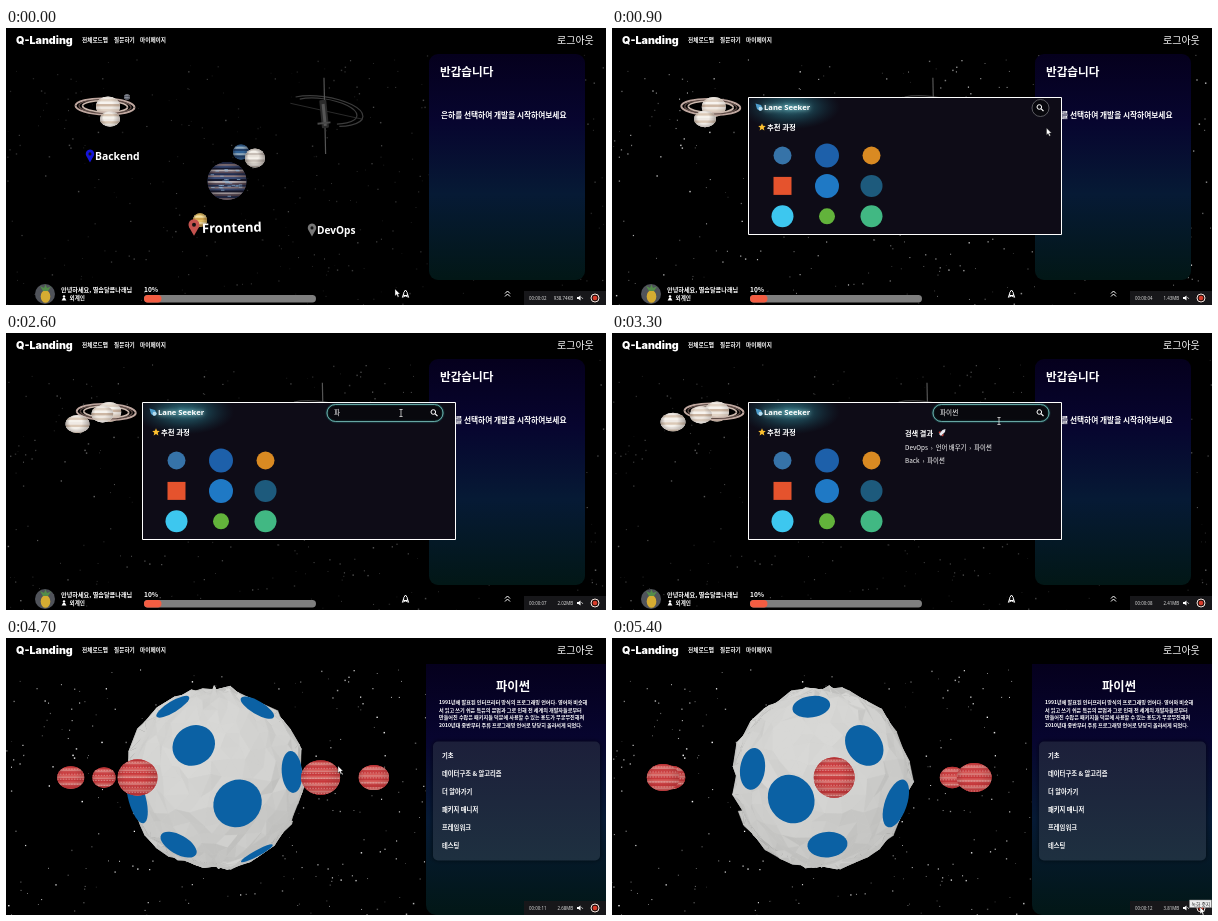
These frames come from a looping animation (600 by 277 pixels, 5500 ms). An HTML page with a canvas:

```html
<!DOCTYPE html>
<html lang="ko">
<head>
<meta charset="utf-8">
<style>
html, body { margin: 0; width: 100%; height: 100%; overflow: hidden; background: #000; }
canvas { display: block; width: 600px; height: 277px; }
</style>
</head>
<body>
<canvas id="stage"></canvas>
<script>
const canvas = document.getElementById('stage');
const ctx = canvas.getContext('2d');
const dpr = window.devicePixelRatio || 1;
canvas.width = 600 * dpr;
canvas.height = 277 * dpr;

const LOOP = 5500, MODAL = 450, LEAVE = 3700, READY = 4300;
const KO = '"Noto Sans CJK KR", "Noto Sans CJK JP", "Noto Sans CJK", sans-serif';
const LATIN = '"Noto Sans", "Open Sans", sans-serif';
const TAU = Math.PI * 2, RAD = Math.PI / 180;

const clamp = v => Math.max(0, Math.min(1, v));
const ease = v => v * v * (3 - 2 * v);

function random(seed) {
  return () => {
    seed = (seed * 1664525 + 1013904223) >>> 0;
    return seed / 4294967296;
  };
}

// Keys are [time, ...values]; values between keys are interpolated.
function track(keys, t, curve = v => v) {
  let i = 0;
  while (i < keys.length - 2 && t >= keys[i + 1][0]) i++;
  const a = keys[i], b = keys[i + 1];
  const k = curve(clamp((t - a[0]) / (b[0] - a[0])));
  return a.slice(1).map((v, j) => v + (b[j + 1] - v) * k);
}

function text(str, x, y, size, weight = 700, color = '#fff', font = KO, align = 'left') {
  ctx.font = `${weight} ${size}px ${font}`;
  ctx.fillStyle = color;
  ctx.textAlign = align;
  ctx.textBaseline = 'alphabetic';
  ctx.fillText(str, x, y);
}

function ellipse(x, y, rx, ry, fill, tilt = 0) {
  ctx.beginPath();
  ctx.ellipse(x, y, rx, ry, tilt, 0, TAU);
  if (fill) { ctx.fillStyle = fill; ctx.fill(); }
}

function box(x, y, w, h, r, fill, stroke, width = 1) {
  ctx.beginPath();
  ctx.roundRect(x, y, w, h, r);
  if (fill) { ctx.fillStyle = fill; ctx.fill(); }
  if (stroke) { ctx.strokeStyle = stroke; ctx.lineWidth = width; ctx.stroke(); }
}

function poly(points, fill, stroke, width = 1, close = true) {
  ctx.beginPath();
  points.forEach(([x, y], i) => i ? ctx.lineTo(x, y) : ctx.moveTo(x, y));
  if (close) ctx.closePath();
  if (fill) { ctx.fillStyle = fill; ctx.fill(); }
  if (stroke) { ctx.strokeStyle = stroke; ctx.lineWidth = width; ctx.stroke(); }
}

// Horizontally banded ball lit from the upper left.
function ball(x, y, rx, ry, colors, step = 2, shadow = .35) {
  ctx.save();
  ellipse(x, y, rx, ry, colors[0]);
  ctx.clip();
  let i = 0;
  for (let band = y - ry; band < y + ry; band += step) {
    ctx.fillStyle = colors[i++ % colors.length];
    ctx.fillRect(x - rx, band, rx * 2, step + .3);
  }
  const shade = ctx.createRadialGradient(x - rx * .3, y - ry * .4, 0, x, y, rx);
  shade.addColorStop(.5, 'rgba(20,8,8,0)');
  shade.addColorStop(1, `rgba(20,8,8,${shadow})`);
  ctx.fillStyle = shade;
  ctx.fillRect(x - rx, y - ry, rx * 2, ry * 2);
  ctx.restore();
}

// --- backdrop and page chrome

const starRandom = random(77);
const stars = Array.from({ length: 420 }, () => ({
  x: starRandom() * 620, y: 26 + starRandom() * 251,
  size: .6 + starRandom() * .9, light: .25 + starRandom() * .75
}));

function drawStars(t, strength, limit) {
  ctx.save();
  ctx.beginPath();
  ctx.rect(0, 26, limit, 251);
  ctx.clip();
  ctx.fillStyle = '#fff';
  for (const s of stars) {
    ctx.globalAlpha = s.light * strength;
    ctx.fillRect((s.x + t * .006) % 620, s.y, s.size, s.size);
  }
  ctx.restore();
}

function drawHeader() {
  text('Q-Landing', 10, 16.3, 10.7, 900, '#fff', 'Inter, Roboto, sans-serif');
  text('전체로드맵', 76, 14, 5.65, 900);
  text('질문하기', 108, 14, 5.65, 900);
  text('마이페이지', 134, 14, 5.65, 900);
  text('로그아웃', 551, 16, 10, 400);
}

function panel(x, w, h, radii) {
  const g = ctx.createLinearGradient(0, 26, 0, 26 + h);
  g.addColorStop(0, '#05001d');
  g.addColorStop(.3, '#07052f');
  g.addColorStop(.62, '#061a35');
  g.addColorStop(1, '#021716');
  box(x, 26, w, h, radii, g);
}

function drawRecorder(t) {
  box(518, 263, 82, 14, 0, '#17171a');
  const second = Math.floor(2.4 + t * .00195);
  const size = track([[0, 938.74 / 1024], [900, 1.43], [1900, 1.62], [3300, 2.41],
    [3900, 2.6], [4700, 2.68], [5400, 3.81]], t)[0];
  text('00:00:' + String(second).padStart(2, '0'), 523, 271.5, 4.4, 400, '#ddd', LATIN);
  const label = size < 1 ? (size * 1024).toFixed(2) + 'KB' : size.toFixed(2) + 'MB';
  text(label, 567, 271.5, 4.4, 400, '#ddd', LATIN, 'right');
  poly([[571, 269], [572.5, 269], [574.5, 267.5], [574.5, 272.5], [572.5, 271], [571, 271]], '#fff');
  poly([[575.3, 269], [577, 271]], null, '#fff', .6, false);
  ellipse(589, 270, 4, 4, '#26100d');
  ctx.strokeStyle = '#f2e5e0';
  ctx.lineWidth = 1;
  ctx.stroke();
  ellipse(589, 270, 2.3, 2.3, '#d63b2a');
}

function drawFooter() {
  ellipse(39, 266, 10, 10, '#50535a');
  ellipse(39.5, 268.5, 4.8, 6.3, '#d6ac32');
  poly([[37, 263], [34, 258], [38, 260], [39.5, 256.5], [41, 260], [45, 258.5], [42, 263]], '#538c4a');
  text('안녕하세요, 별솜달콤나래님', 55, 264.3, 6.15);
  ellipse(58, 268.5, 1.2, 1.2, '#fff');
  poly([[55.6, 272.4], [57, 270], [59, 270], [60.4, 272.4]], '#fff');
  text('외계인', 63.5, 272.3, 5.6);
  text('10%', 138, 264, 6.6);
  box(138, 267, 172, 7.5, 3.7, '#7f7f7f');
  box(138, 267, 17.5, 7.5, 3.7, '#f45d42');
  poly([[397.5, 267.5], [397.8, 264.5], [399.5, 262], [401.2, 264.5], [401.5, 267.5]], null, '#fff', 1);
  poly([[397.5, 266], [396.3, 269.3], [399.5, 268], [402.7, 269.3], [401.5, 266]], null, '#fff', .9, false);
  for (const y of [265.5, 268.5]) poly([[499, y], [501.5, y - 2.5], [504, y]], null, '#fff', 1, false);
}

// --- galaxy page

function pin(x, y, s, color) {
  ctx.beginPath();
  ctx.arc(x, y - s * .25, s * .5, Math.PI * .85, Math.PI * .15);
  ctx.lineTo(x, y + s * .75);
  ctx.fillStyle = color;
  ctx.fill();
  ellipse(x, y - s * .25, s * .18, s * .18, '#111');
}

function drawRinged(t) {
  const [x, y] = track([[0, 99, 78.5], [1900, 98.5, 79.5], [3300, 102, 78.5]], t);
  const [mx, my, mr] = track([[0, 104, 91, 10], [900, 93, 91, 11], [1900, 82, 93, 11.5], [3300, 61, 89, 12.5]], t);
  const [nx, ny] = track([[0, 121, 69], [600, 114, 72], [1900, 104, 80], [3300, 89, 82]], t);
  const pale = ['#f0e9e2', '#e2d4c6', '#f7f3ee', '#cdb7a4'];
  const ring = (from, to) => {
    [[29.5, 8, '#c0a8a0', 2], [26, 6.8, '#5d4a45', 1.5], [22.5, 5.7, '#cdb9ae', 1.7]].forEach(([rx, ry, color, w]) => {
      ctx.beginPath();
      ctx.ellipse(x, y, rx, ry, .03, from, to);
      ctx.strokeStyle = color;
      ctx.lineWidth = w;
      ctx.stroke();
    });
  };
  if (t < 600) ball(nx, ny, 3, 2.7, ['#8a8f99', '#565b66'], 1.4);
  ring(Math.PI, TAU);
  ball(x + 3, y, 12, 10, pale, 2.5, .15);
  ring(0, Math.PI);
  if (t > 1900) ball(nx, ny, 11, 8.5, pale, 2.5, .2);
  ball(mx, my, mr, mr * .74, ['#efe9e3', '#dbc9b7', '#f6f2ec'], 2.4, .3);
}

function drawStriped(t) {
  const a = t * -.0002;
  const around = (dx, dy) => [221 + dx * Math.cos(a) - dy * Math.sin(a), 153 + dx * Math.sin(a) + dy * Math.cos(a)];
  const small = (p, r, colors) => ball(p[0], p[1], r, r * .95, colors, 2.2);
  small(around(14, -29), 8, ['#326396', '#8fa9bc', '#213f68']);
  ball(221, 153, 19.5, 19, ['#202f54', '#8d7b80', '#384b77', '#161a31', '#b6adb0', '#5c4c58'], 1.9);
  const r = random(9);
  ctx.fillStyle = '#8bb0d3';
  for (let i = 0; i < 28; i++) {
    const q = r() * TAU, d = r() * 17;
    ctx.fillRect(219 + Math.cos(q) * d, 153 + Math.sin(q) * d, 3.5, .7);
  }
  small(around(28, -23), 10, ['#e8e2da', '#f5f1eb', '#c8bfb7']);
  small(around(-27, 39), 7, ['#e3bf65', '#f4dfa0', '#d0a34e']);
}

function drawStation(t) {
  ctx.save();
  ctx.translate(318 + 3 * Math.sin(t / 700), 90);
  ctx.rotate(-.1);
  ctx.strokeStyle = '#3c3c3c';
  ctx.lineWidth = 1.2;
  for (const rx of [40, 34]) {
    ctx.beginPath();
    ctx.ellipse(0, -7, rx, rx * .36, .25, -2.4, 1.1);
    ctx.stroke();
  }
  poly([[-32, -18], [38, 5]], null, '#333', .8, false);
  poly([[4, -40], [-2, 36]], null, '#555', 1.2, false);
  box(-3, -18, 7, 28, 1, '#2b2b2b');
  box(-1, -14, 3, 22, 0, '#555');
  box(-7, 4, 13, 2, 0, '#4a4a4a');
  ctx.restore();
}

function drawLabels() {
  pin(84, 128, 8.5, '#1515d8');
  text('Backend', 89, 132.2, 10.4, 600, '#fff', LATIN);
  pin(188, 199.5, 11, '#c5534f');
  ctx.save();
  ctx.translate(196, 205);
  ctx.rotate(-.025);
  text('Frontend', 0, 0, 13.1, 600, '#fff', LATIN);
  ctx.restore();
  pin(306, 202, 8.5, '#777');
  text('DevOps', 311, 206, 10.1, 600, '#fff', LATIN);
}

function drawGalaxy(t) {
  const strength = track([[0, .3], [900, .8], [1900, .45], [3300, .35]], t)[0];
  drawStars(t, strength, 600);
  drawRinged(t);
  drawStation(t);
  if (t < MODAL) {
    drawStriped(t);
    drawLabels();
  }
  panel(423, 156, 226, 9);
  text('반갑습니다', 434, 48, 11.6);
  text('은하를 선택하여 개발을 시작하여보세요', 435, 89.8, 7.7);
  drawFooter();
  if (t >= MODAL) drawModal(t);
}

// --- course search dialog

const courses = [
  ['#3673a8', 9], ['#1d60aa', 12], ['#d98a22', 9],
  ['#e5532d', 9, true], ['#1f79c5', 12], ['#1d5a7c', 11],
  ['#3dc7ef', 11], ['#62b33b', 8], ['#41b883', 11]
];

function drawSearch(t) {
  const open = ease(clamp((t - 1150) / 250));
  const left = 420 - 99 * open;
  ctx.save();
  if (open > 0) { ctx.shadowColor = '#2f9c96'; ctx.shadowBlur = 1.5 * dpr; }
  box(left, 71.5, 437 - left, 17, 8.5, '#08080d', open ? '#79b8b4' : '#6d6d72', .8);
  ctx.restore();
  ellipse(427.3, 79, 2.3, 2.3);
  ctx.strokeStyle = '#fff';
  ctx.lineWidth = 1;
  ctx.stroke();
  poly([[429, 80.7], [431.5, 83.2]], null, '#fff', 1.2, false);
  if (open < 1) return;
  const typed = '파이썬'.slice(0, clamp((t - 2100) / 800) * 3);
  if (typed) text(typed, 328, 82, 6.6, 400);
  else text('search', 328, 82, 6.4, 400, '#8c8c90', LATIN);
}

function drawResults() {
  text('검색 결과', 293, 102.6, 7.2);
  poly([[333.5, 96], [333, 99], [329, 103], [327, 101], [330.5, 97]], '#e8e8ef');
  poly([[329, 98], [326.5, 99], [327.5, 100.5]], '#d3483c');
  poly([[332, 100.5], [331, 103.5], [329.5, 102.5]], '#d3483c');
  text('DevOps  ›  언어 배우기  ›  파이썬', 293, 117, 6.4, 500);
  text('Back  ›  파이썬', 293, 130, 6.4, 500);
}

function drawTitleGlow() {
  ctx.save();
  ctx.beginPath();
  ctx.rect(137, 70, 312, 136);
  ctx.clip();
  ctx.translate(178, 79);
  ctx.scale(1, .45);
  const glow = ctx.createRadialGradient(0, 0, 0, 0, 0, 50);
  glow.addColorStop(0, 'rgba(60,150,165,.75)');
  glow.addColorStop(.5, 'rgba(35,105,120,.45)');
  glow.addColorStop(1, 'rgba(20,70,85,0)');
  ctx.fillStyle = glow;
  ctx.fillRect(-50, -50, 100, 100);
  ctx.restore();
}

function drawModal(t) {
  box(136.5, 69.5, 313, 137, 0, '#0e0c17', '#fff', 1);
  drawTitleGlow();
  poly([[143.5, 75.5], [149, 77], [151, 81], [148, 83], [145, 81]], '#4d9dcc');
  ellipse(148.5, 80.7, 2, 2, '#b9dced');
  ctx.save();
  ctx.shadowColor = '#bff';
  ctx.shadowBlur = 4 * dpr;
  text('Lane Seeker', 152, 82, 7.6, 700, '#fff', LATIN);
  ctx.restore();
  const points = Array.from({ length: 10 }, (_, i) => {
    const a = i * Math.PI / 5 - Math.PI / 2, r = i % 2 ? 1.8 : 4;
    return [150 + Math.cos(a) * r, 99.3 + Math.sin(a) * r];
  });
  poly(points, '#fdc02f');
  text('추천 과정', 155, 102, 7.4);
  courses.forEach(([color, r, square], i) => {
    const x = 170.5 + i % 3 * 44.5, y = 127.5 + Math.floor(i / 3) * 30.4;
    if (square) box(x - r, y - r, r * 2, r * 2, 0, color);
    else ellipse(x, y, r, r, color);
  });
  drawSearch(t);
  if (t >= 3000) drawResults();
}

// --- planet page

const ROWS = 18, COLS = 34, CX = 210, CY = 140;
const bumpRandom = random(31);
const jitter = amount => (bumpRandom() - .5) * amount;
const terrain = Array.from({ length: (ROWS + 1) * COLS }, (_, i) => {
  const row = Math.floor(i / COLS);
  return {
    lat: row % ROWS ? ((row + jitter(.7)) / ROWS - .5) * Math.PI : (row / ROWS - .5) * Math.PI,
    lon: (i % COLS + row % 2 / 2 + jitter(.7)) / COLS * TAU,
    r: row % ROWS ? 89 + jitter(8) : 88
  };
});

function terrainPoint(row, col, spin) {
  const { lat, lon, r } = terrain[row * COLS + col % COLS];
  const flat = r * Math.cos(lat), a = lon + spin;
  return [flat * Math.sin(a), r * Math.sin(lat), flat * Math.cos(a)];
}

function drawFacet(a, b, c) {
  if (a[2] + b[2] + c[2] < 0) return;
  const u = b.map((v, i) => v - a[i]), v = c.map((w, i) => w - a[i]);
  const n = [u[1] * v[2] - u[2] * v[1], u[2] * v[0] - u[0] * v[2], u[0] * v[1] - u[1] * v[0]];
  const light = (-.2 * n[0] - .45 * n[1] + .87 * n[2]) / (Math.hypot(...n) || 1);
  const tone = Math.round(192 + 24 * clamp(light));
  const color = `rgb(${tone},${tone},${tone - 2})`;
  poly([a, b, c].map(p => [CX + p[0], CY + p[1]]), color, color, .5);
}

function drawGlobe(spin) {
  ellipse(CX, CY, 85, 85, '#d2d2d0');
  for (let row = 0; row < ROWS; row++) {
    for (let col = 0; col < COLS; col++) {
      const at = (i, j) => terrainPoint(row + i, col + j, spin);
      const shift = row % 2;
      drawFacet(at(0, 0), at(0, 1), at(1, shift));
      drawFacet(at(0, 1 - shift), at(1, 1), at(1, 0));
    }
  }
}

// Surface spots as [longitude, latitude, radius].
const spots = [
  [-16, 22, 22], [15, -17, 25], [-69, -14, 25], [-42, -50, 20],
  [54, 54, 19], [-60, 55, 19], [61, 4, 21], [70, -60, 18], [-101, 6, 21]
];

function drawSpots(turn) {
  for (const [lon, lat, r] of spots) {
    const a = (lon + turn) * RAD, b = lat * RAD;
    const x = Math.cos(b) * Math.sin(a), y = -Math.sin(b), z = Math.cos(b) * Math.cos(a);
    if (z > .06) ellipse(CX + x * 87, CY + y * 87, r * z, r, '#0b61a4', Math.atan2(y, x));
  }
}

function drawMoon(angle) {
  const a = angle * RAD;
  const x = 157 * Math.sin(a) / (1 - .17 * Math.cos(a));
  const r = 15 + 5.5 * Math.cos(a), ry = r * (1 - .17 * Math.min(1, Math.abs(x) / 150));
  ball(CX + x, 139.5, r, ry, ['#c8383b', '#d65a58', '#da7d7a', '#c94345'], 1.7, .15);
  ctx.save();
  ellipse(CX + x, 139.5, r, ry);
  ctx.clip();
  ctx.setLineDash([1.5, 1.3]);
  for (let y = -ry + 3; y < ry; y += 5) {
    poly([[CX + x - r, 139.5 + y], [CX + x + r, 139.5 + y]], null, '#e6aaa6', .7, false);
  }
  ctx.restore();
}

function drawPlanet(t) {
  const since = t - 4700;
  drawStars(t - READY + 200, 1, 420);
  const moons = [-25, 35, 88, 170, -128, -105].map(a => a + since * .041);
  const depth = a => Math.cos(a * RAD);
  moons.sort((a, b) => depth(a) - depth(b));
  moons.filter(a => depth(a) < 0).forEach(drawMoon);
  const turn = since * .068;
  drawGlobe(turn * RAD);
  drawSpots(turn);
  moons.filter(a => depth(a) >= 0).forEach(drawMoon);
}

const summary = [
  '1991년에 발표된 인터프리터 방식의 프로그래밍 언어다. 영어와 비슷해',
  '서 읽고 쓰기 쉬운 특유의 문법과 그로 인해 전 세계의 개발자들로부터',
  '만들어진 수많은 패키지들 덕분에 사용할 수 있는 용도가 무궁무진해져',
  '2010년대 중반부터 주류 프로그래밍 언어로 당당히 올라서게 되었다.'
];
const topics = ['기초', '데이터구조 & 알고리즘', '더 알아가기', '패키지 매니저', '프레임워크', '테스팅'];

function drawCourse(t) {
  const ready = t >= READY;
  if (ready) drawPlanet(t);
  panel(420, 180, 251, [0, 0, 0, 10]);
  if (!ready) {
    text('데이터를 불러오는 중입니다.', 433, 38.5, 6.2);
    text('데이터를 불러오는 중입니다.', 427, 58.5, 6.2);
    box(0, 272, 69, 5, 0, '#18191b');
    text('k7c106.p.local:3000/planet/3', 1, 278, 5, 400, '#9a9a9a', LATIN);
    return;
  }
  text('파이썬', 507, 52.8, 12.3, 700, '#fff', KO, 'center');
  summary.forEach((line, i) => text(line, 433, 66.3 + i * 7.4, 5.1, 900));
  ctx.save();
  ctx.shadowColor = 'rgba(0,0,0,.6)';
  ctx.shadowBlur = 5 * dpr;
  const card = ctx.createLinearGradient(0, 103, 0, 222);
  card.addColorStop(0, '#1c1f3a');
  card.addColorStop(1, '#1e3040');
  box(427, 103.5, 167, 119, 5, card);
  ctx.restore();
  topics.forEach((topic, i) => text(topic, 436, 119.5 + i * 18.1, 6.3));
}

// --- pointer

function drawPointer(t) {
  const [x, y] = track([[0, 389, 261], [250, 398, 264], [500, 401, 250], [900, 434.5, 100],
    [1150, 428, 82], [1500, 410, 79], [1900, 395, 80], [2900, 395, 80], [3300, 387, 88],
    [3600, 332, 128], [4900, 332, 128], [5300, 588, 269]], t, ease);
  if (t >= 1300 && t < 3450) {
    poly([[x, y - 3.5], [x, y + 3.5]], null, '#ddd', .8, false);
    for (const dy of [-3.5, 3.5]) poly([[x - 1.6, y + dy], [x + 1.6, y + dy]], null, '#ddd', .8, false);
    return;
  }
  const shape = [[0, 0], [0, 7], [1.6, 5.6], [2.8, 8.2], [4, 7.6], [2.9, 5.1], [5, 5]];
  poly(shape.map(p => [x + p[0], y + p[1]]), '#fff', '#222', .4);
}

function draw(t) {
  ctx.setTransform(dpr, 0, 0, dpr, 0, 0);
  ctx.fillStyle = '#000';
  ctx.fillRect(0, 0, 600, 277);
  if (t < LEAVE) drawGalaxy(t);
  else drawCourse(t);
  drawHeader();
  drawRecorder(t);
  if (t >= 5300) {
    box(577.5, 262, 22, 7.5, 0, '#eee', '#888', .5);
    text('녹화 중지', 579.5, 267.8, 4.8, 400, '#333');
  }
  drawPointer(t);
}

const start = performance.now();
function tick() {
  const t = (performance.now() - start) % LOOP;
  draw(Math.floor(t / 100) * 100);
  requestAnimationFrame(tick);
}
tick();
</script>
</body>
</html>
```
